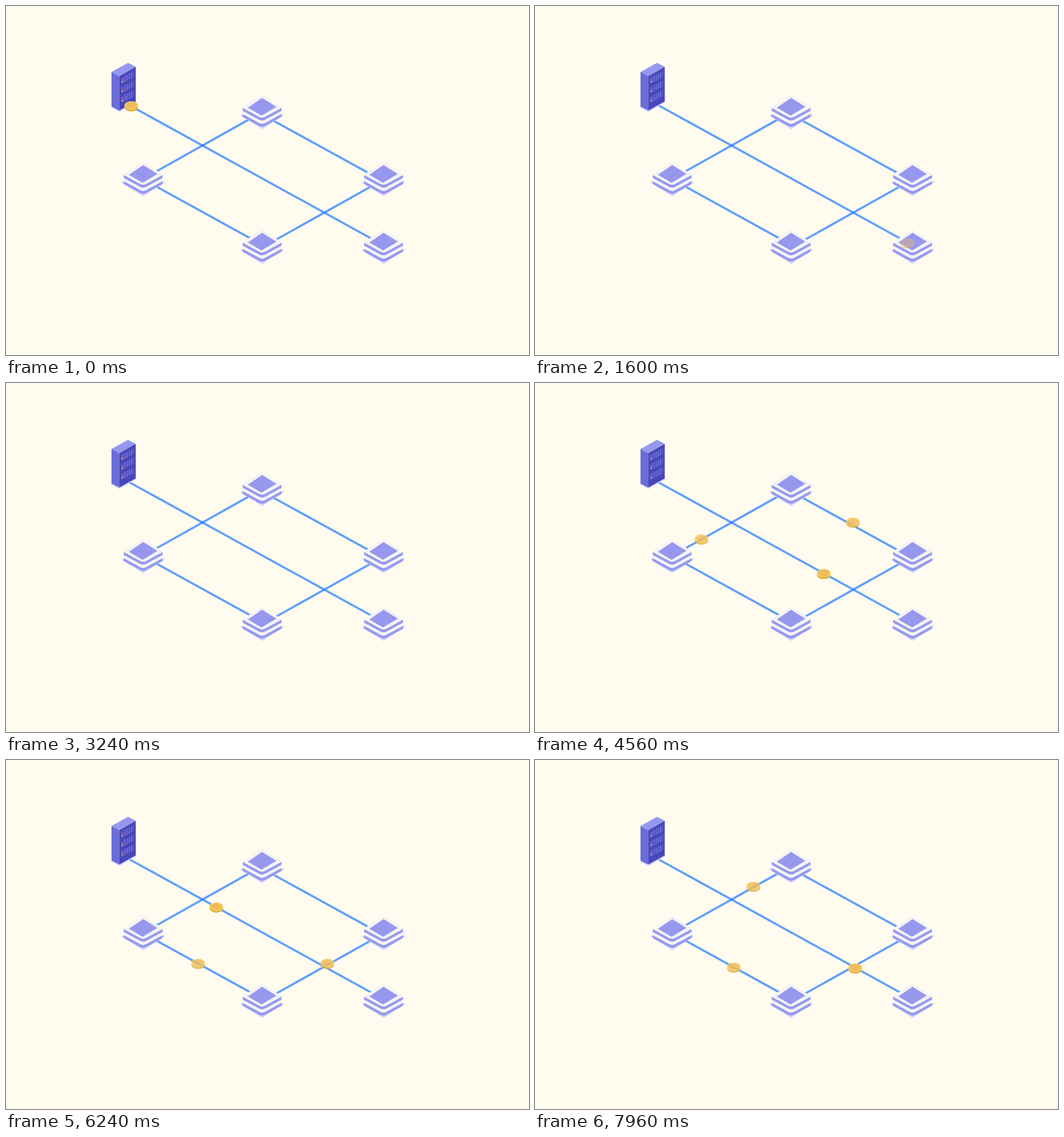
Animation of 917 by 611 pixels, one loop 8000 ms. Source, as an HTML page:

```html
<!DOCTYPE html>
<html lang="en">
<head>
<meta charset="utf-8">
<title>Network</title>
<style>
  html, body { margin: 0; width: 100%; height: 100%; overflow: hidden; background: #fffbef; }
  svg { display: block; width: 917px; height: 611px; }
  .links { stroke: #1a77ff; stroke-width: 3.8; stroke-opacity: .68; }
</style>
</head>
<body>
<svg viewBox="0 0 917 611">
  <defs>
    <g id="node">
      <path fill="#d1d4ff" d="M-38.5 13.5 0-8 38.5 13 0 37.5z"/>
      <path fill="#f3f3f5" d="M-34.5-.5 0-22.5 34.5-.5V13L4 30Q0 32-4 30L-34.5 13z"/>
      <path id="band" fill="#9698ee" d="M-34 .5-5 16.2Q0 19 5 16.2L34 .5V5.5L5 21.2Q0 24-5 21.2L-34 5.5z"/>
      <use href="#band" y="10.8"/>
      <path fill="#9698ee" d="M0-17 25-1.5-1 14-25 0z"/>
    </g>
    <g id="coin">
      <ellipse cy="1.6" rx="12" ry="7.4" fill="#e5b13f"/>
      <ellipse cy="-1.4" rx="12" ry="7.5" fill="#f4d064"/>
      <ellipse cy="-1.4" rx="9.8" ry="5.9" fill="#efbb5c"/>
    </g>
    <g id="rack">
      <path fill="#5654c4" d="M201.5 125.5 225 112.5V124L201.5 137z"/>
      <path fill="#4543b4" d="M207 122.5 224 113V124L207 133.5z"/>
      <path stroke="#7274da" stroke-width="2.6" stroke-dasharray="2.8 1.5"
        d="M207.6 124.6 223.6 115.8M207.6 128.2 223.6 119.4M207.6 131.6 223.6 122.8"/>
      <circle cx="204" cy="128" r="1.3" fill="#d0559f"/>
      <circle cx="204" cy="132.4" r="1.3" fill="#e6c27a"/>
    </g>
  </defs>

  <g class="links">
    <path d="M210 170.3 650 412.3"/>
    <path d="M255 294.4 436 193"/>
    <path d="M458 194.8 645 297.5"/>
    <path d="M255 311.4 438 412"/>
    <path d="M464 414.4 650 310.3"/>
  </g>

  <path fill="#cfd3ff" d="M183.5 177 199 185.5 229 168 214 160z"/>
  <path fill="#9599ee" d="M185 115.5 214 99.5 227.5 106.5 198.5 123z"/>
  <path fill="#6a6cd8" d="M185 115.5 198.5 123V183L185 176z"/>
  <path fill="#4846bb" d="M198.5 123 227.5 106.5V167L198.5 183z"/>
  <use href="#rack"/>
  <use href="#rack" y="16.7"/>
  <use href="#rack" y="33.4"/>
  <g id="stage"></g>
</svg>
<script>
const LOOP = 8000;
const stage = document.getElementById('stage');

const point = (x, y) => ({ x, y });
const mix = (a, b, k) => point(a.x + (b.x - a.x) * k, a.y + (b.y - a.y) * k);
const clamp = v => Math.min(1, Math.max(0, v));
const ease = k => .5 - .5 * Math.cos(Math.PI * clamp(k));

function add(shape) {
  const el = document.createElementNS('http://www.w3.org/2000/svg', 'use');
  el.setAttribute('href', '#' + shape);
  return stage.appendChild(el);
}

function place(el, { x, y }) {
  el.setAttribute('transform', `translate(${x} ${y})`);
}

// Points where coins enter and leave
const server = point(206, 168);
const top_ = point(449, 184.5);
const left = point(240.5, 302);
const right = point(662, 302);
const bottom = point(449, 420.5);
const far = point(662, 420.5);
const crossA = mix(server, far, .305);
const crossB = mix(server, far, .772);

for (const { x, y } of [top_, left, right, bottom, far]) place(add('node'), point(x, y - 6.5));

const trip = (from, to, lag = 0, peak = .85) => ({ from, to, lag, peak, el: add('coin') });
const mainTrip = (from, to) => trip(from, to, 0, 1);

// Coins ease over [start, start + span] and are seen from show to hide.
const waves = [
  { start: -178, span: 1615, show: -400, hide: 1360, trips: [mainTrip(server, far)] },
  { start: 1424, span: 1975, show: 1600, hide: 3240, trips: [mainTrip(far, server)] },
  { start: 3600, span: 1900, show: 3600, hide: 5280,
    trips: [mainTrip(crossA, far), trip(top_, right), trip(crossA, left)] },
  { start: 5560, span: 1300, show: 5600, hide: 6840,
    trips: [mainTrip(crossB, server), trip(bottom, left), trip(bottom, right)] },
  { start: 7150, span: 1310, show: 7200, hide: 8400,
    trips: [mainTrip(crossA, far), trip(left, top_), trip(left, bottom, 140)] }
];

function draw(t) {
  for (const { start, span, show, hide, trips } of waves) {
    const fade = t < show ? 0 : clamp(.4 + (t - show) / 400) * clamp((hide - t) / 320);
    for (const { from, to, lag, peak, el } of trips) {
      place(el, mix(from, to, ease((t - start - lag) / span)));
      el.setAttribute('opacity', fade * peak);
    }
  }
}

function tick() {
  draw(performance.now() % LOOP);
  requestAnimationFrame(tick);
}
tick();
</script>
</body>
</html>
```
